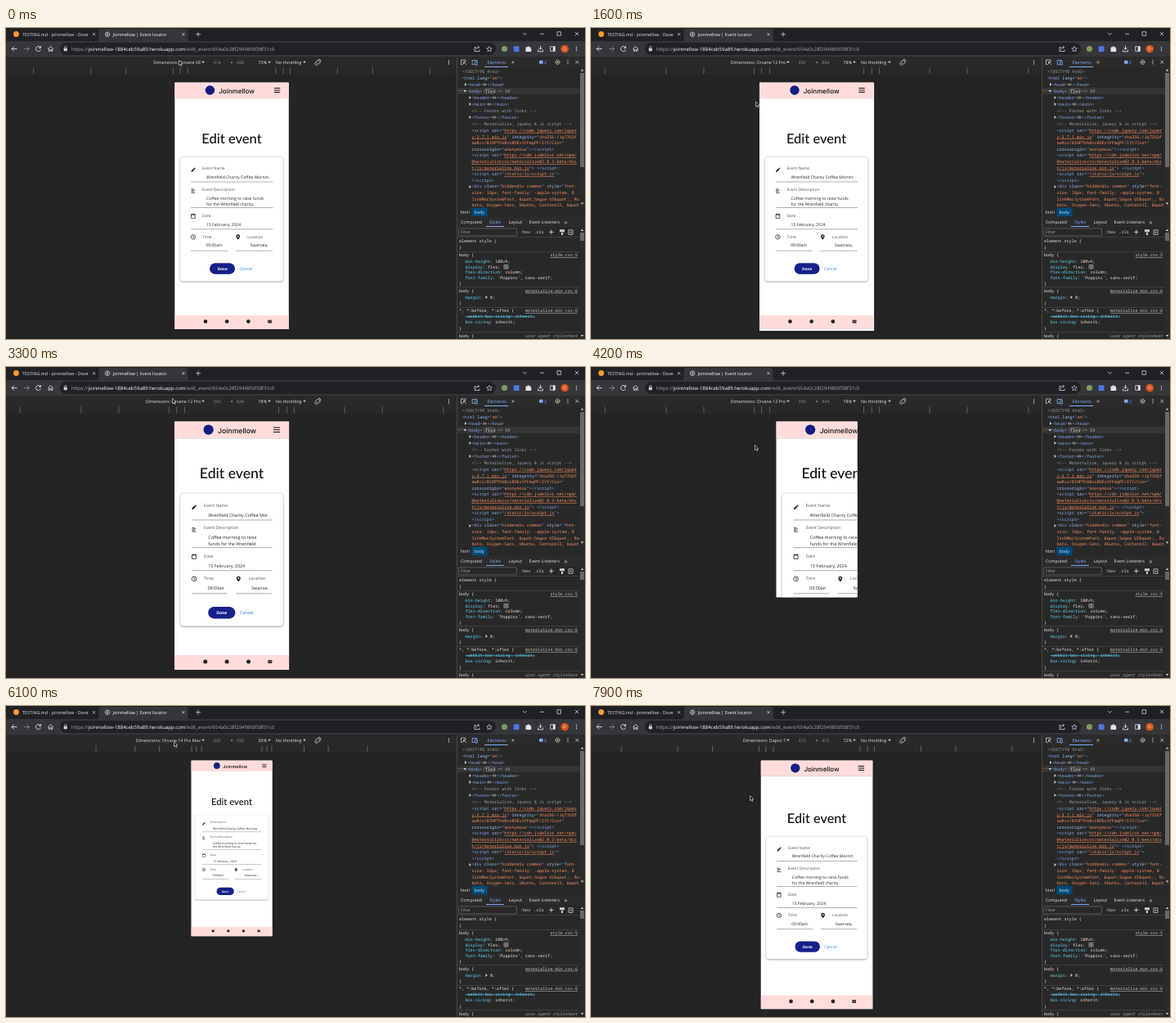
An HTML page for the animation above (8 s loop, 708 px wide and 380 px high).

```html
<!DOCTYPE html>
<html lang="en">
<head>
<meta charset="utf-8">
<title>Event form in device emulation</title>
<style>
html, body { margin: 0; width: 100%; height: 100%; overflow: hidden; background: #242424; }
body > svg { display: block; }
text { white-space: pre; font-family: "Open Sans", "Noto Sans", sans-serif; text-rendering: geometricPrecision; }
.mono { font-family: "Noto Sans Mono", "DejaVu Sans Mono", monospace; }
.brand { font-family: Inter, sans-serif; font-weight: 500; }
.head { font-family: Lato, sans-serif; font-weight: 500; }
.card { filter: drop-shadow(0 2px 3px #0006); }
</style>
</head>
<body>
<svg id="stage" width="708" height="380" viewBox="0 0 708 380"></svg>
<script>
const stage = document.getElementById('stage');
const SITE = 'Joinmellow', LIGHT = '#e3e3e3', ICON = '#d0d0d0', BLUE = '#7cacf8', INK = '#222', BAR = '#2b2b2c';
const PX = 0.461;   // stage pixels per screen pixel
const MID = 276, TOP = 66.5;

const devices = [
  { name: 'Orvane SR', w: 414, h: 896, zoom: 73, lines: ['Coffee morning to raise funds', 'for the Wrenfield charity.'] },
  { name: 'Orvane 12 Pro', w: 390, h: 844, zoom: 78, lines: ['Coffee morning to raise', 'funds for the Wrenfield'] },
  { name: 'Orvane 14 Pro Max', w: 430, h: 932, zoom: 50, lines: ['Coffee morning to raise funds for', 'the Wrenfield charity.'] },
  { name: 'Dapso 7', w: 412, h: 915, zoom: 72, lines: ['Coffee morning to raise funds', 'for the Wrenfield charity.'] }
];
devices.forEach(d => d.scale = d.zoom / 100 * PX);

function el(parent, tag, attrs = {}, content) {
  const e = document.createElementNS('http://www.w3.org/2000/svg', tag);
  for (const k in attrs) e.setAttribute(k, attrs[k]);
  if (content != null) e.textContent = content;
  parent.append(e);
  return e;
}
const rect = (p, x, y, width, height, fill, rx = 0, more) =>
  el(p, 'rect', { x, y, width, height, fill, rx, ...more });
const circle = (p, cx, cy, r, fill, more) => el(p, 'circle', { cx, cy, r, fill, ...more });
const text = (p, x, y, s, size, fill, more) =>
  el(p, 'text', { x, y, 'font-size': size, fill, ...more }, s);
const stroke = (p, d, color = ICON, width = 0.8, more) =>
  el(p, 'path', { d, fill: 'none', stroke: color, 'stroke-width': width, ...more });
const shape = (p, d, fill = ICON, more) => el(p, 'path', { d, fill, ...more });
const cross = (x, y, r) => stroke(stage, `M${x - r} ${y - r}l${2 * r} ${2 * r}m0 ${-2 * r}l${-2 * r} ${2 * r}`);
const dots = (x, y) => [-2, 0, 2].forEach(d => circle(stage, x, y + d, 0.65, ICON));
const caret = (x, y) => shape(stage, `M${x - 1.8} ${y - 1}h3.6l-1.8 2.2z`);
const label = (x, y, s, size = 5.3, fill = LIGHT, more) => text(stage, x, y, s, size, fill, more);

// Code text: parts split by "|", the first letter of each picks its colour.
const inks = { b: BLUE, a: '#a8c7fa', o: '#fe8d59', u: '#fe8d59', g: '#9aa0a6', w: LIGHT, p: '#5cd5fb', s: '#5cd5fb' };
function code(x, y, source) {
  const line = label(x, y + 1.7, null, 5.1, LIGHT, { class: 'mono' });
  for (const part of source.split('|')) {
    const span = el(line, 'tspan', { fill: inks[part[0]] }, part.slice(1));
    if (part[0] === 'u') span.setAttribute('text-decoration', 'underline');
    if (part[0] === 's') span.setAttribute('text-decoration', 'line-through');
  }
}

function drawBrowser() {
  rect(stage, 0, 0, 708, 16, '#202124');
  shape(stage, 'M111 16q2.5 0 2.5-3V4q0-3 3-3h103q3 0 3 3v9q0 3 2.5 3z', '#35363a');
  rect(stage, 0, 16, 708, 19.5, '#35363a');
  circle(stage, 12.5, 7.5, 3.4, '#ff9a2e');
  label(20, 9.5, `TESTING.md - ${SITE.toLowerCase()} - Dove`, 5.4);
  cross(107.5, 7.7, 1.6);
  circle(stage, 124, 7.7, 2.8, 'none', { stroke: ICON, 'stroke-width': 0.7 });
  stroke(stage, 'M121.5 7.7h5M124 5q-2 2.7 0 5.4q2-2.7 0-5.4', ICON, 0.5);
  label(130.5, 9.5, `${SITE} | Event locator`, 5.4, '#fff');
  cross(217, 7.7, 1.6);
  stroke(stage, 'M232 7.7h6m-3-3v6');
  stroke(stage, 'M632 6l2.3 2.3 2.3-2.3M653 7.2h5M674 4.7h4.6v4.6h-4.6z');
  cross(698, 7, 2.2);

  stroke(stage, 'M13.5 25.5h-6.5m3-3l-3 3 3 3', LIGHT, 0.9);
  stroke(stage, 'M22 25.5h6.5m-3-3l3 3-3 3', '#85868a', 0.9);
  stroke(stage, 'M42 23.8a3 3 0 1 0 .4 2.5M42.4 22v2.4h-2.4', LIGHT, 0.9);
  stroke(stage, 'M51.5 25.3l3-2.7 3 2.7M52.3 25v3.4h1.5v-2h1.6v2h1.5v-3.4', LIGHT);
  rect(stage, 66, 18, 533, 15, '#202124', 7.5);
  rect(stage, 70.7, 24.8, 4, 3.4, ICON, 0.5);
  stroke(stage, 'M71.5 25v-1.3a1.2 1.2 0 0 1 2.4 0v1.3');
  const url = label(80, 27.7, null, 6);
  [['https://', '#a5a8ac'], [`${SITE.toLowerCase()}-1884ceb59a89.herokuapp.com`, '#fff'],
   ['/edit_event/654a0c28f29498fdf38f31c0', '#a5a8ac']].forEach(([s, fill]) => el(url, 'tspan', { fill }, s));
  stroke(stage, 'M575 23.5h-2v5h6v-2M574.5 26.5q.5-3 4-3m-1.5-1.5l1.7 1.5-1.7 1.5');
  stroke(stage, 'M591 22.5l1 2.2 2.3.2-1.8 1.5.6 2.3-2.1-1.3-2.1 1.3.6-2.3-1.8-1.5 2.3-.2z', ICON, 0.7);
  circle(stage, 609.5, 25.5, 3.6, '#7d9b62');
  rect(stage, 620.7, 22.2, 6.8, 6.8, '#4a78e8', 1);
  shape(stage, 'M635.5 23.5h2a1.2 1.2 0 0 1 2.4 0h2v2.2a1.2 1.2 0 0 1 0 2.2v1.2h-6.4z', LIGHT);
  stroke(stage, 'M653.5 21.8v4.5m-2-2l2 2 2-2M650.5 26.5v2.3h6v-2.3', LIGHT, 0.9);
  stroke(stage, 'M665.7 22.7h5.6v5.6h-5.6z', LIGHT);
  rect(stage, 668.8, 22.7, 2.5, 5.6, LIGHT);
  circle(stage, 683.2, 25.5, 4.8, '#d9531e');
  label(683.2, 27.3, 'D', 5, '#fff', { 'text-anchor': 'middle' });
  dots(697.5, 25.5);
}

function drawDeviceBar() {
  rect(stage, 0, 35.5, 552, 12.5, '#292929');
  rect(stage, 0, 48, 552, 8.7, '#282829');
  caret(241, 41.7); caret(322, 41.7); caret(365, 41.7);
  label(276, 43.7, '×', 5.3, ICON, { 'text-anchor': 'middle' });
  label(330, 43.6, 'No throttling');
  stroke(stage, 'M378.8 41.5l2.5-2.5 3 3-2.5 2.5zM377.5 42.5q.3 3 3 3.2M382 38q2.5.2 3 3', LIGHT);
  dots(541.5, 42);
}

function drawTree() {
  rect(stage, 551.5, 35.5, 156.5, 344.5, '#282828');
  rect(stage, 551.5, 35.5, 156.5, 12.5, BAR);
  stroke(stage, 'M562 41v-2h-5.5v5.5h2M559.5 41.5l3.5 3.3m-3.5-.8v-2.5h2.5');
  stroke(stage, 'M569.5 44.3h3.5M570.2 43.5v-4h6M573.8 41h2.5v4h-2.5z', BLUE, 0.9);
  label(588.5, 43.7, 'Elements', 5.4, BLUE);
  rect(stage, 585, 47, 29, 1, BLUE);
  label(618, 44.2, '»', 8, ICON);
  rect(stage, 652, 39.7, 4.6, 4, BLUE, 0.6);
  label(658, 43.8, '2', 5.3, BLUE);
  circle(stage, 674.5, 41.7, 2.5, 'none', { stroke: LIGHT, 'stroke-width': 1, 'stroke-dasharray': '1.5 .46' });
  circle(stage, 674.5, 41.7, 1, LIGHT);
  dots(687, 41.7);
  cross(698.3, 41.7, 1.9);

  rect(stage, 552, 73, 150, 8, '#353536');
  label(553, 78, '⋯', 5, LIGHT);
  code(558, 53, 'g<!DOCTYPE html>');
  code(558, 61, 'b<html |alang|b="|oen|b">');
  const folded = (x, y, tag) => {
    shape(stage, `M${x - 3} ${y - 2}l2.4 2-2.4 2z`);
    code(x, y, `b<${tag}>|w  |b</${tag}>`);
    const dx = x + (tag.length + 2) * 3.06;
    rect(stage, dx + 0.5, y - 1.6, 5, 3.4, '#5a5a5c', 1);
    [1.6, 3, 4.4].forEach(o => circle(stage, dx + o, y, 0.45, LIGHT));
  };
  folded(564, 69, 'head');
  shape(stage, 'M559.3 76h4l-2 2.6z');
  code(564, 77, 'b<body>');
  rect(stage, 584.5, 74.2, 14, 5.7, 'none', 2.8, { stroke: '#8a8a8a', 'stroke-width': 0.5 });
  code(586, 76.8, 'wflex');
  code(601, 77, 'g== $0');
  folded(569.5, 85, 'header');
  folded(569.5, 93, 'main');
  folded(569.5, 109, 'footer');
  // Backslashes keep the HTML parser from reading these strings as markup.
  code(569.5, 101, 'g<\!-- Footer with links --\>');
  code(569.5, 117, 'g<\!-- Materialize, Jquery & Js script --\>');
  [
    'b<\script |asrc|b="|uhttps://code.jquery.com/jquer',
    'uy-3.7.1.min.js|b" |aintegrity|b="|osha256-/JqT3SQf',
    'oawRcv/BIHPThkBvs0OEvtFFmqPF/lYI/Cxo=|b"',
    'acrossorigin|b="|oanonymous|b"><\/script>',
    'b<\script |asrc|b="|uhttps://cdn.jsdelivr.net/npm/',
    'u@materializecss/materialize@2.0.3-beta/dis',
    'ut/js/materialize.min.js|b"> <\/script>',
    'b<\script |asrc|b="|u/static/js/script.js|b">',
    'b<\/script>',
    'b<div |aclass|b="|ohiddendiv common|b" |astyle|b="|ofont-',
    'osize: 16px; font-family: -apple-system, B',
    'olinkMacSystemFont, &quot;Segoe UI&quot;, Ro',
    'oboto, Oxygen-Sans, Ubuntu, Cantarell, &quot'
  ].forEach((s, i) => code(569.5, 125.2 + i * 7.62, s));
  shape(stage, 'M566.5 192l2.4 2-2.4 2z');
  rect(stage, 701.5, 48, 6.5, 171, BAR);
  rect(stage, 702, 55, 5, 115, '#68696b');
  shape(stage, 'M702.8 52.5h3.6l-1.8-2.3zM702.8 213.5h3.6l-1.8 2.3z');
}

function drawStyles() {
  rect(stage, 551.5, 219.5, 156.5, 11, '#282828');
  label(555.5, 226.8, 'html');
  rect(stage, 569.5, 219.7, 19, 10.8, '#004a77');
  label(572.5, 226.8, 'body', 5.3, '#c2e7ff');
  rect(stage, 551.5, 230.5, 156.5, 12.5, BAR);
  label(556, 238.8, 'Computed');
  label(591, 238.8, 'Styles', 5.3, BLUE);
  rect(stage, 587, 242, 22, 1, BLUE);
  label(614.5, 238.8, 'Layout');
  label(639.5, 238.8, 'Event Listeners');
  label(682.5, 239.5, '»', 8, ICON);
  rect(stage, 553.5, 244.8, 71, 9, '#282828', 1, { stroke: '#757575', 'stroke-width': 0.6 });
  label(556, 251, 'Filter', 5.2, '#9aa0a6');
  code(629, 249.2, 'w:hov'); code(645.5, 249.2, 'w.cls');
  stroke(stage, 'M664 249.3h5.6m-2.8-2.8v5.6', LIGHT);
  shape(stage, 'M677 246.3h6v3h-6zM679 250h2v3h-2z');
  stroke(stage, 'M688 246.8h5v5.5h-5zM689.5 249.5h2m-1-1v2');
  [255, 273, 316.5, 341, 371.5].forEach(y => rect(stage, 551.5, y, 150, 0.6, '#4d4e50'));
  [
    [554, 260, 'welement.style {'], [554, 268, 'w}'],
    [554, 277.5, 'wbody {'], [561.5, 285, 'pmin-height|w: 100vh;'], [561.5, 291.8, 'pdisplay|w: flex;'],
    [561.5, 298.5, 'pflex-direction|w: column;'], [561.5, 305, "pfont-family|w: 'Poppins', sans-serif;"], [554, 312, 'w}'],
    [554, 321, 'wbody {'], [561.5, 329, 'pmargin|w:   0;'], [554, 336.5, 'w}'],
    [554, 345.5, 'w*, *:before, *:after {'], [561.5, 352.5, 's-webkit-box-sizing: inherit;'],
    [561.5, 359.5, 'pbox-sizing|w: inherit;'], [554, 367, 'w}'], [554, 376, 'wbody {']
  ].forEach(row => code(...row));
  shape(stage, 'M586.5 327l2.4 2-2.4 2z');
  stroke(stage, 'M609 289.5h5v4.6h-5zM611.5 289.5v4.6M609 291.8h5', ICON, 0.6);
  const origin = (y, s, more) => label(699, y + 1.7, s, 5.1, '#c7c7c7', { class: 'mono', 'text-anchor': 'end', ...more });
  const link = { 'text-decoration': 'underline' };
  origin(277.5, 'style.css:5', link);
  origin(321, 'materialize.min.css:6', link);
  origin(345.5, 'materialize.min.css:6', link);
  origin(376, 'user agent stylesheet', { 'font-style': 'italic', fill: '#9aa0a6' });
  rect(stage, 701.5, 243, 6.5, 137, BAR);
  rect(stage, 702, 250, 5, 10, '#68696b');
  shape(stage, 'M702.8 248h3.6l-1.8-2.3zM702.8 375h3.6l-1.8 2.3z');
  rect(stage, 551, 35.5, 0.8, 344.5, '#4d4e50');
}

// The web page in CSS pixels; form parts are placed from the vertical centre.
function drawPage(parent, { w, h, scale, lines }) {
  const page = el(parent, 'g', { transform: `scale(${scale})` });
  const cx = w / 2, cy = h / 2, left = 59, colW = (w - 148) / 2, col2 = left + colW + 30;
  rect(page, 0, 0, w, h, '#fff');
  rect(page, 0, 56, w, 3, '#d9d5d5');
  rect(page, 0, 0, w, 56, '#ffdcda');
  circle(page, cx - 79, 28, 17, '#141e82');
  text(page, cx - 47, 40, SITE, 24, '#111', { class: 'brand' });
  stroke(page, `M${w - 53} 21h22m-22 7.5h22m-22 7.5h22`, '#111', 3);
  rect(page, 0, h - 50, w, 50, '#ffdcda');
  for (let i = 0; i < 3; i++) circle(page, w * (0.27 + 0.188 * i), h - 28, 7, INK);
  const mx = w * 0.834, my = h - 28;
  rect(page, mx - 7, my - 5.5, 14, 11, INK, 1.5);
  stroke(page, `M${mx - 6} ${my - 3}l6 4 6-4`, '#ffdcda', 1.5);

  const form = el(page, 'g', { transform: `translate(0 ${cy})` });
  text(form, cx, -228, 'Edit event', 49, '#111', { class: 'head', 'text-anchor': 'middle' });
  rect(form, 20, -177, w - 40, 450, '#fff', 10, { class: 'card', stroke: '#ddd' });
  const icon = (x, y, d) => stroke(form, d, INK, 2.2, { transform: `translate(${x} ${y})` });
  const solid = (x, y, d) => shape(form, d, INK, { transform: `translate(${x} ${y})`, 'fill-rule': 'evenodd' });
  const caption = (x, y, s) => text(form, x, y + 5, s, 14.5, '#555');
  const value = (x, y, s, right) => {
    const box = el(form, 'svg', { x, y: y - 12, width: right - x, height: 24 });
    text(box, 0, 17, s, 15, INK);
  };
  const rule = (x, y, width) => rect(form, x, y - 1, width, 2, '#8a8a8a');
  const end = w - 72, full = w - 116;

  solid(67, -131, 'M-7 8v-4l9-9 4 4-9 9zM3-6l2-2 4 4-2 2z');
  caption(100, -137, 'Event Name');
  value(115, -104, 'Wrenfield Charity Coffee Morning', end);
  rule(left, -87, full);

  icon(67, -54, 'M-7-7h9m-9 4.5h14m-14 4.5h9m-9 4.5h14');
  caption(100, -60, 'Event Description');
  lines.forEach((s, i) => value(115, -28 + i * 21, s, w - 40));
  rule(left, 7, full);

  icon(67, 37, 'M-7-6h14v14h-14zM-7-4.5h14M-4-9v4m8-4v4');
  caption(100, 36, 'Date');
  value(115, 69, '15 February, 2024', end);
  rule(left, 85, full);

  icon(67, 113, 'M8 0a8 8 0 1 1-16 0a8 8 0 1 1 16 0M0-5v6l4 2');
  caption(100, 112, 'Time');
  value(113, 144, '09:00am', left + colW - 11);
  rule(left, 163, colW);

  solid(col2 + 8, 113, 'M0 10q-7-8-7-12a7 7 0 0 1 14 0q0 4-7 12zM0-4.5a2.5 2.5 0 1 0 .1 0z');
  caption(col2 + 42, 112, 'Location');
  value(col2 + 52, 144, 'Swansea, UK', end);
  rule(col2, 163, colW);

  rect(form, cx - 80, 208, 92, 40, '#16208a', 20);
  text(form, cx - 34, 233, 'Done', 14, '#fff', { 'text-anchor': 'middle', 'font-weight': 700 });
  text(form, cx + 28, 233, 'Cancel', 15, '#2583e0');
  return page;
}

drawBrowser();
drawDeviceBar();
drawTree();
drawStyles();
const ruler = stroke(stage, '', '#77787a', 0.7);
const rightText = { 'text-anchor': 'end' }, midText = { 'text-anchor': 'middle' };
const nameText = label(238, 43.6, '', 5.3, LIGHT, rightText);
const widthText = label(258, 43.6, '', 5.3, '#8c8d90', midText);
const heightText = label(286.8, 43.6, '', 5.3, '#8c8d90', midText);
const zoomText = label(319, 43.6, '', 5.3, LIGHT, rightText);
const frame = el(stage, 'svg', { y: TOP });
rect(frame, 0, 0, 200, 320, '#fff');
const pages = devices.map(d => drawPage(frame, d));
const cursor = shape(stage, 'M0 0v6l1.4-1.2 1 2.2 1-.5-1-2.1h1.9z', '#111', { stroke: '#eee', 'stroke-width': 0.6 });

// time, toolbar device, frame device, page layout, cursor x, y
const steps = [
  [0, 0, 0, 0, 211.5, 39.5],
  [1300, 0, 1, 0, 201.5, 90],
  [1400, 1, 1, 0, 201.5, 90],
  [1700, 1, 1, 1, 201.5, 90],
  [2800, 1, 1, 1, 201, 86],
  [2900, 1, 1, 1, 200, 80],
  [3000, 1, 1, 1, 199, 74],
  [3100, 1, 1, 1, 198, 70],
  [3300, 1, 1, 1, 203.5, 38.5],
  [4200, 1, 2, 1, 200.5, 95.5],
  [4300, 2, 2, 2, 200.5, 95.5],
  [5200, 2, 2, 2, 201, 90],
  [5300, 2, 2, 2, 202, 78],
  [5400, 2, 2, 2, 203, 64],
  [5500, 2, 2, 2, 204, 52],
  [5600, 2, 2, 2, 205.5, 43.5],
  [7700, 2, 3, 2, 194.5, 109.5],
  [7800, 3, 3, 3, 194.5, 109.5]
];
const presets = [320, 375, 425, 768, 1024, 1440];
let shown;

function show(step) {
  const [, bar, size, layout, x, y] = step;
  const d = devices[bar], f = devices[size];
  nameText.textContent = `Dimensions: ${d.name}`;
  widthText.textContent = d.w;
  heightText.textContent = d.h;
  zoomText.textContent = `${d.zoom}%`;
  ruler.setAttribute('d', presets.flatMap(p => [-1, 1].map(s => `M${MID + s * p / 2 * d.scale} 48.5v7.7`)).join(''));
  frame.setAttribute('x', MID - f.w * f.scale / 2);
  frame.setAttribute('width', f.w * f.scale);
  frame.setAttribute('height', f.h * f.scale);
  pages.forEach((p, i) => p.style.display = i === layout ? '' : 'none');
  cursor.setAttribute('transform', `translate(${x} ${y})`);
}

function tick() {
  const t = performance.now() % 8000;
  const step = steps.findLast(s => s[0] <= t);
  if (step !== shown) show(shown = step);
  requestAnimationFrame(tick);
}
tick();
</script>
</body>
</html>
```
